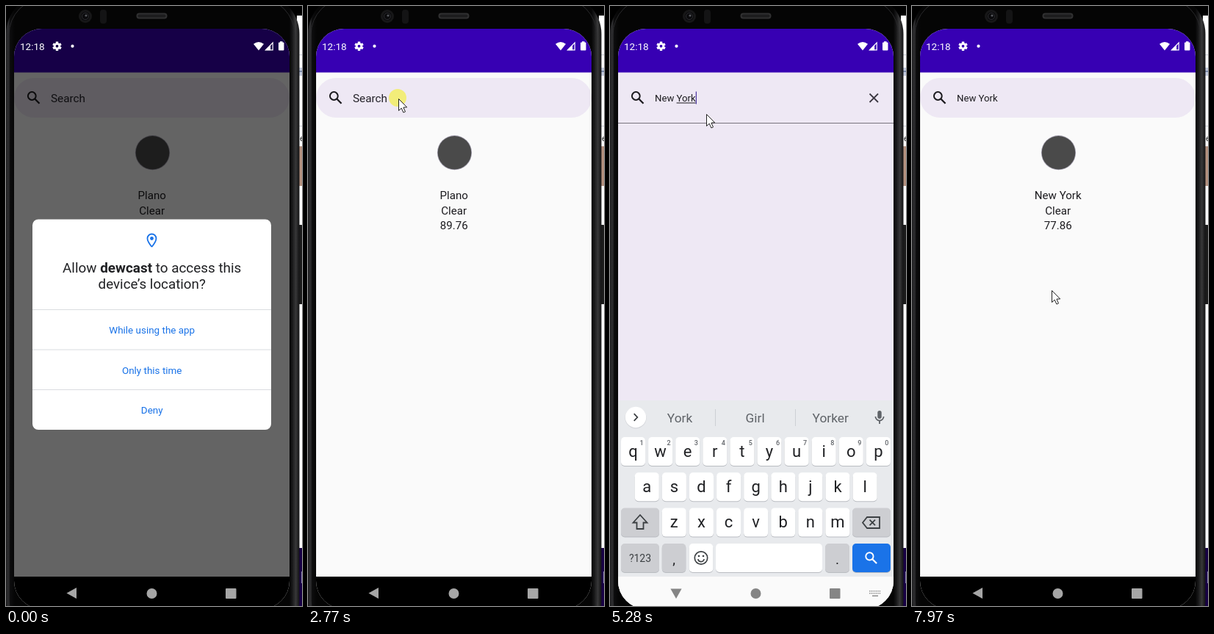
An HTML page with a canvas that plays this animation: 403 px wide and 817 px high, repeating every 8000 ms.

```html
<!DOCTYPE html>
<html lang="en">
<head>
<meta charset="utf-8">
<title>City search</title>
<style>
html, body { margin: 0; width: 100%; height: 100%; overflow: hidden; background: #000; }
canvas { display: block; width: 403px; height: 817px; }
</style>
</head>
<body>
<canvas id="stage"></canvas>
<script>
const W = 403, H = 817, LOOP = 8000;
const canvas = document.getElementById('stage');
const dpr = window.devicePixelRatio || 1;
canvas.width = W * dpr;
canvas.height = H * dpr;
const c = canvas.getContext('2d');
const FONT = 'Roboto, Arial, sans-serif';

const clamp = v => Math.max(0, Math.min(1, v));
const span = (t, from, len) => clamp((t - from) / len);
const lerp = (a, b, k) => a + (b - a) * k;
const smooth = k => k * k * (3 - 2 * k);

function bezier(x1, y1, x2, y2) {
  const at = (a, b, s) => 3 * (1 - s) * (1 - s) * s * a + 3 * (1 - s) * s * s * b + s * s * s;
  return x => {
    if (x <= 0 || x >= 1) return clamp(x);
    let lo = 0, hi = 1;
    for (let i = 0; i < 30; i++) {
      const mid = (lo + hi) / 2;
      if (at(x1, x2, mid) < x) lo = mid; else hi = mid;
    }
    return at(y1, y2, lo);
  };
}
const easeOpen = bezier(.05, .7, .1, 1);
const easeClose = bezier(0, 1, 0, 1);

// Drawing helpers
function rect(x, y, w, h, color) { c.fillStyle = color; c.fillRect(x, y, w, h); }
function box(x, y, w, h, r, color) {
  c.beginPath(); c.roundRect(x, y, w, h, r);
  c.fillStyle = color; c.fill();
}
function disc(x, y, r, color) {
  c.beginPath(); c.arc(x, y, r, 0, 7);
  c.fillStyle = color; c.fill();
}
function ring(x, y, r, w, color) {
  c.beginPath(); c.arc(x, y, r, 0, 7);
  c.lineWidth = w; c.strokeStyle = color; c.stroke();
}
function trace(pts, close) {
  c.beginPath();
  for (let i = 0; i < pts.length; i += 2) c.lineTo(pts[i], pts[i + 1]);
  if (close) c.closePath();
}
function line(pts, w, color, close) {
  trace(pts, close);
  c.lineWidth = w; c.strokeStyle = color; c.stroke();
}
function poly(pts, color) { trace(pts, true); c.fillStyle = color; c.fill(); }
function text(s, x, y, size, color, align = 'center', weight = 400) {
  c.font = `${weight} ${size}px ${FONT}`;
  c.textAlign = align;
  c.fillStyle = color;
  c.fillText(s, x, y);
  return c.measureText(s).width;
}
function at(x, y, draw) { c.save(); c.translate(x, y); draw(); c.restore(); }
function faded(alpha, draw) {
  c.save(); c.globalAlpha *= alpha; draw(); c.restore();
}

// Icons
function lens(x, y, s, color) {
  at(x, y, () => {
    c.scale(s, s);
    ring(-2.2, -2.2, 5.4, 2, color);
    line([1.8, 1.8, 8, 8], 2.3, color);
  });
}
function mic(x, y) {
  const g = '#5f6368';
  box(x - 2.7, y - 9, 5.4, 11, 2.7, g);
  c.beginPath(); c.arc(x, y - 1, 5.6, 0, Math.PI);
  c.lineWidth = 1.7; c.strokeStyle = g; c.stroke();
  line([x, y + 4.5, x, y + 9], 1.8, g);
}
function gear(x, y) {
  at(x, y, () => {
    for (let i = 0; i < 6; i++) {
      rect(-1.7, -6.2, 3.4, 4, '#fff');
      c.rotate(Math.PI / 3);
    }
    ring(0, 0, 3.3, 2.8, '#fff');
  });
}
function pin(x, y) {
  c.beginPath();
  c.moveTo(x, y + 9);
  c.bezierCurveTo(x - 4, y + 4, x - 6, y + 1, x - 6, y - 2.5);
  c.arc(x, y - 2.5, 6, Math.PI, 0);
  c.bezierCurveTo(x + 6, y + 1, x + 4, y + 4, x, y + 9);
  c.lineWidth = 1.8; c.strokeStyle = '#1a73e8'; c.stroke();
  disc(x, y - 2.5, 2.4, '#1a73e8');
}
function clock(x, y) {
  const g = '#49454f';
  c.beginPath(); c.arc(x + 1, y, 8, Math.PI, Math.PI * 2.75);
  c.lineWidth = 2; c.strokeStyle = g; c.stroke();
  poly([x - 11, y, x - 3, y, x - 7, y + 4], g);
  line([x + 1, y - 4.5, x + 1, y + 1, x + 5, y + 3], 1.6, g);
}

// Timeline
const TYPED = 'New York';
const keyTimes = [3640, 3800, 3950, 4100, 4420, 4600, 4760, 4900];
const clicks = [1130, 2690, 5960];
const mouse = [
  [350, 410, 790], [1050, 191, 554], [1750, 191, 554], [2490, 140, 196],
  [2660, 123, 126], [2850, 123, 126], [3300, 131, 147], [5340, 131, 147],
  [5880, 362, 746], [6500, 362, 746], [7600, 190, 387], [8000, 190, 387]
];
const OPEN = 2870, CLOSE = 6181;

function report(t, shift) {
  const late = t >= CLOSE, ink = '#1c1b1f';
  disc(199.5, 199.7 + shift, 23.6, '#a9a5b4');
  disc(199.5, 199.7 + shift, 22.8, '#4a4a4a');
  [late ? TYPED : 'Plano', 'Clear', late ? '77.86' : '89.76']
    .forEach((s, i) => text(s, 198.7, 263 + i * 20.6 + shift, 15.1, ink));
}

function searchBar(t, p) {
  const ink = '#1c1b1f', top = 98 - 8 * p, height = 54 + 633 * p;
  box(11, top, 375, height, 27 * (1 - p), '#eee8f4');
  lens(37.5, 124.7, 1, ink);

  const n = keyTimes.filter(k => k <= t).length;
  const active = t >= OPEN && t < CLOSE;
  if (n) {
    const query = TYPED.slice(0, n);
    const end = 61 + text(query, 61, 130, 13.2, ink, 'left');
    if (active && n !== 4) {
      const start = n > 4 ? 61 + c.measureText('New ').width : 61;
      rect(start, 131.5, end - start, 1, ink);
    }
    caret(end);
  } else {
    text('Search', 61, 131, 15.3, '#25232a', 'left');
    caret(61);
  }

  function caret(x) {
    const since = t - (n ? keyTimes[n - 1] : OPEN);
    if (active && since % 1000 < 500) rect(x, 116.5, 1.2, 17, '#4a35a0');
  }

  if (active) {
    line([353.5, 119.5, 365, 131], 1.8, '#3c3842');
    line([365, 119.5, 353.5, 131], 1.8, '#3c3842');
  }
  if (p > 0) faded(p, () => {
    rect(11, 152 + 7 * p, 375, 1, '#79747e');
    if (t >= CLOSE) {
      clock(36, 178);
      text(TYPED, 57, 183, 15.1, '#1c1b1f', 'left');
    }
  });
}

function key(x, y, w, color) {
  box(x, y + 1, w, 39, 5, '#b9bcc1');
  box(x, y, w, 39, 5, color);
}

function strip(t) {
  const g = '#5f6368', y = 560;
  const words = t >= keyTimes[0];
  disc(35, y + .8, 14.6, '#d3d5d9');
  disc(35, y, 14.2, '#fff');
  const d = words ? 2.3 : -2.3;
  line([35 - d, y - 4.8, 35 + d, y, 35 - d, y + 4.8], 1.8, '#3c4043');
  mic(367, y);
  if (!words) {
    lens(85, y, .9, g);
    c.beginPath(); c.roundRect(131, y - 7, 14, 14, 2);
    c.lineWidth = 1.7; c.strokeStyle = g; c.stroke();
    poly([140, y + 8, 146, y + 8, 146, y + 2], '#e8eaed');
    line([140, y + 7, 140, y + 2, 145, y + 2, 140, y + 7], 1.2, g);
    disc(135.5, y - 2.5, 1.1, g);
    disc(140.5, y - 2.5, 1.1, g);
    line([135, y + 1, 137.5, y + 2.5], 1.3, g);
    text('GIF', 191, y + 4.5, 13.5, g, 'center', 900);
    c.beginPath(); c.roundRect(239, y - 7, 14, 15, 1.5);
    c.lineWidth = 1.7; c.strokeStyle = g; c.stroke();
    rect(243, y - 9, 6, 5, g);
    [-2, 1, 4].forEach((dy, i) => rect(242, y + dy, i > 1 ? 5 : 8, 1.4, g));
    rect(279, y - 11, 1, 22, '#cfd1d5');
    [306.5, 313, 319.5].forEach(x => disc(x, y, 2, g));
  } else if (t < 6060) {
    const list = t < keyTimes[4] ? ['New', 'News', 'Newer'] : ['York', 'Girl', 'Yorker'];
    list.forEach((s, i) => text(s, 95 + i * 102.6, 567, 17.3, g));
    rect(143, 549, 1, 23, '#cdd0d4');
    rect(252, 549, 1, 23, '#cdd0d4');
  }
}

function keyboard(t) {
  const dark = '#202124', grey = '#cdced2', pitch = 37.1;
  rect(11, 537, 375, 290, '#e8eaed');
  strip(t);
  [['qwertyuiop', 15], ['asdfghjkl', 33.8], ['zxcvbnm', 70.8]].forEach(([row, x0], r) => {
    const y = 587 + r * 48.3;
    [...row].forEach((ch, i) => {
      const x = x0 + i * pitch;
      key(x, y, 33, '#fff');
      text(ch, x + 16.5, y + 26.5, 22, dark);
      if (!r) text((i + 1) % 10, x + 28, y + 11, 9, '#5f6368', 'center', 500);
    });
  });
  key(15, 683.5, 52, grey);
  line([41, 693, 50.5, 703.5, 45.5, 703.5, 45.5, 712, 36.5, 712, 36.5, 703.5, 31.5, 703.5], 1.8, '#3c4043', true);
  key(330, 683.5, 52, grey);
  line([344, 703.5, 350, 696, 367, 696, 367, 711, 350, 711], 1.8, '#3c4043', true);
  line([353.5, 699.7, 361, 707.2], 1.7, '#3c4043');
  line([361, 699.7, 353.5, 707.2], 1.7, '#3c4043');

  const y = 732;
  key(15, y, 52, grey);
  text('?123', 41, y + 25, 14, '#3c4043');
  key(70.8, y, 32.5, grey);
  text(',', 87, y + 28, 19, dark);
  key(107.8, y, 32.5, '#fff');
  ring(124, y + 19.5, 8.7, 1.7, '#3c4043');
  disc(121, y + 17, 1.3, '#3c4043');
  disc(127, y + 17, 1.3, '#3c4043');
  c.beginPath(); c.arc(124, y + 20.5, 4.2, .15, 3); c.stroke();
  key(144, y, 145, '#fff');
  key(293, y, 33, grey);
  text('.', 309.5, y + 28, 19, dark);
  key(330, y, 52, '#1a73e8');
  lens(355.5, y + 19.5, .95, '#fff');
}

function navBar(k) {
  const v = Math.round(250 * k);
  rect(11, 777, 375, 40, `rgb(${v},${v},${v})`);
}
function navIcons(k) {
  const color = k > .5 ? '#858585' : '#a6a6a6';
  faded(Math.abs(1 - 2 * clamp((1 - k) * 2)), () => {
    at(90, 799.5, () => {
      c.rotate(-Math.PI / 2 * smooth(k));
      poly([-7.5, 0, 6, -7.6, 6, 7.6], color);
    });
    disc(198.5, 800, 7, color);
    box(299, 793, 14.5, 14, 1, color);
  });
  if (k === 1) {
    for (let i = 0; i < 7; i++) {
      rect(353 + i * 2.3, 796, 1.3, 1.4, color);
      rect(353 + i * 2.3, 799, 1.3, 1.4, color);
    }
    rect(357, 802.5, 8, 1.4, color);
  }
}

function dialog(k) {
  if (k >= 1) return;
  const ink = '#202124', blue = '#1a73e8', mid = 198.7;
  at(0, 550 * k * k, () => faded((1 - k) ** 2, () => {
    box(36, 290.5, 325, 286.5, 8, '#fff');
    pin(198.5, 319);
    const parts = [['Allow ', 400], ['dewcast', 700], [' to access this', 400]];
    const widths = parts.map(([s, w]) => {
      c.font = `${w} 18.9px ${FONT}`;
      return c.measureText(s).width;
    });
    let x = mid - widths.reduce((a, b) => a + b) / 2;
    parts.forEach(([s, w], i) => {
      text(s, x, 363, 18.9, ink, 'left', w);
      x += widths[i];
    });
    text('device’s location?', mid, 385, 18.8, ink);
    ['While using the app', 'Only this time', 'Deny'].forEach((s, i) => {
      rect(36, 413 + i * 54.5, 325, 1, '#dadce0');
      text(s, mid, 446 + i * 54.5, 13.45, blue);
    });
  }));
}

function statusBar() {
  text('12:18', 19, 60, 13.5, '#fff', 'left');
  gear(69.5, 54.7);
  disc(90.5, 54.7, 2.1, '#fff');
  c.beginPath();
  c.moveTo(344, 60.5);
  c.lineTo(337, 51.8);
  c.quadraticCurveTo(344, 46.2, 351, 51.8);
  c.fillStyle = '#fff'; c.fill();
  line([353.5, 59.8, 363.2, 59.8, 363.2, 50], 1.2, '#fff', true);
  poly([353, 60.2, 360.2, 60.2, 360.2, 53], '#fff');
  box(371, 49.5, 7.5, 11, 1, '#fff');
  rect(373, 48.2, 3.5, 2, '#fff');
}

function shell() {
  rect(0, 0, W, H, '#000');
  rect(396, 13, 7, 725, '#fff');
  rect(396, 738, 7, 79, '#170044');
  rect(402, 770, 1, 16, '#8b7fb0');
  rect(399, 66, 4, 1, '#cfd3dc');
  rect(399, 84, 4, 11, '#c3cbdd');
  rect(399, 88, 4, 2, '#7d8cab');
  rect(399, 163, 4, 1, '#cfd3dc');
  rect(399, 191, 4, 54, '#b4917f');
  text('e', 400, 184, 11, '#222', 'left');
  box(396, 298, 8, 108, 2, '#1b1b1b');

  const g = c.createLinearGradient(0, 0, 399, 0);
  [[0, '#1d1d1f'], [.008, '#303032'], [.014, '#0d0d0e'], [.03, '#050505'], [.967, '#050505'],
   [.978, '#1a1a1b'], [.988, '#3a3a3b'], [1, '#161617']].forEach(s => g.addColorStop(...s));
  box(0, -16, 399.5, 880, 54, g);
  c.beginPath(); c.roundRect(4, -11, 389, 870, 50);
  c.lineWidth = 1; c.strokeStyle = '#29292b'; c.stroke();
  disc(108, 14, 9, '#171718');
  disc(108, 14, 6, '#0a0a0c');
  ring(108, 14, 4.5, 1, '#2c2c30');
  disc(109, 13, 1.6, '#55575c');
  box(128, 5, 9, 19, 4, '#141415');
  box(177.5, 9.5, 42, 8, 4, '#303031');
  box(179.5, 11.5, 38, 4, 2, '#1d1d1e');
}

function pointer(t) {
  if (t < mouse[0][0]) return;
  let i = 0;
  while (i < mouse.length - 2 && t >= mouse[i + 1][0]) i++;
  const [t0, x0, y0] = mouse[i], [t1, x1, y1] = mouse[i + 1];
  const k = smooth(span(t, t0, t1 - t0));
  const x = lerp(x0, x1, k), y = lerp(y0, y1, k);
  if (clicks.some(s => t >= s && t < s + 140)) {
    faded(.65, () => disc(x - 1, y - 1, 12, '#f5ef38'));
  }
  at(x + .5, y + .5, () => {
    const arrow = [0, 0, 0, 16, 3.7, 12.6, 6.4, 18.5, 9, 17.4, 6.4, 11.6, 11.2, 11.4];
    poly(arrow, '#fff');
    line(arrow, 1, '#222', true);
  });
}

function draw(t) {
  c.setTransform(dpr, 0, 0, dpr, 0, 0);
  shell();

  const p = t < CLOSE ? easeOpen(span(t, OPEN, 560)) : 1 - easeClose(span(t, CLOSE, 350));
  const up = span(t, 2980, 290), down = span(t, 6200, 200);
  const exit = span(t, 1400, 165);
  const nav = t < 6200 ? span(t, 2980, 200) : 1 - down;

  c.save();
  c.beginPath(); c.roundRect(11, 31, 375, 790, 38); c.clip();
  rect(11, 31, 375, 790, '#fafafa');
  report(t, 633 * p);
  searchBar(t, p);
  rect(11, 31, 375, 59.5, '#3700b3');
  if (up > 0 && down < 1) {
    const away = t < 6200 ? (1 - up) ** 3 : down * down;
    at(0, 240 * away, () => faded(t < 6200 ? clamp(up * 2) : 1 - down, () => keyboard(t)));
  }
  rect(11, 31, 375, 746, `rgba(0,0,0,${.6 * (1 - exit)})`);
  navBar(nav);
  statusBar();
  dialog(exit);
  navIcons(nav);
  c.restore();
  pointer(t);
}

const begin = performance.now();
function tick() {
  draw((performance.now() - begin) % LOOP);
  requestAnimationFrame(tick);
}
tick();
</script>
</body>
</html>
```
